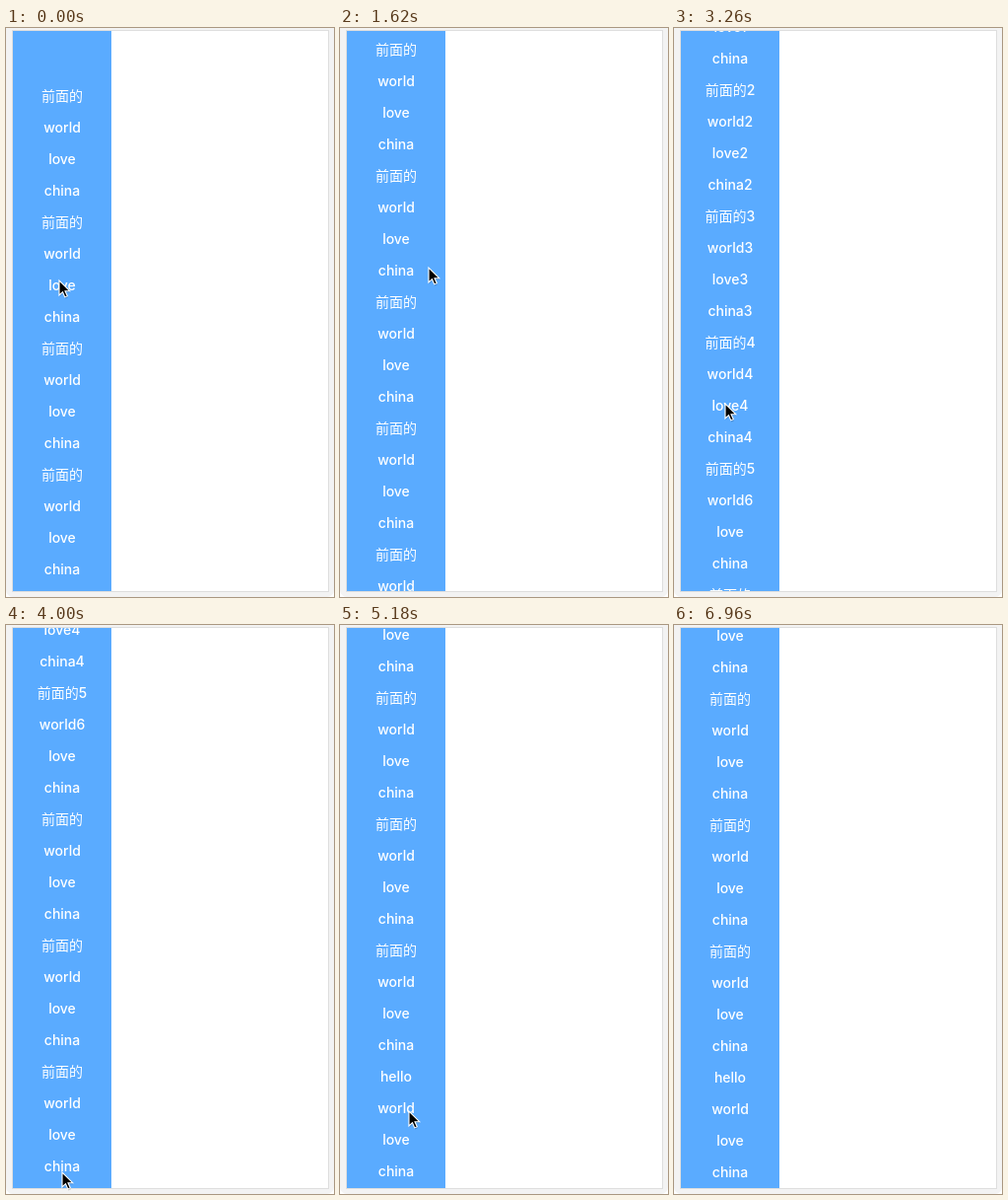
An HTML page that plays this animation: 333x577 px, repeating every 8910 ms.

```html
<!DOCTYPE html>
<html lang="en">
<head>
<meta charset="utf-8">
<title>Scrolling list</title>
<style>
  html, body { margin: 0; width: 100%; height: 100%; overflow: hidden; background: #fff; }
  svg { display: block; width: 333px; height: 577px; }
  text {
    font: 500 14px Inter, "Noto Sans CJK SC", "Noto Sans CJK", sans-serif;
    fill: #fff;
    text-anchor: middle;
  }
</style>
</head>
<body>
<svg viewBox="0 0 333 577">
  <defs>
    <clipPath id="view"><rect x="7" y="3" width="100" height="568"/></clipPath>
  </defs>
  <rect y="-10" width="333" height="587" rx="7" fill="#f3f3f3"/>
  <rect x="6.5" y="2.5" width="321" height="569" fill="#fff" stroke="#dedede"/>
  <rect x="7" y="3" width="100" height="568" fill="#5aabff"/>
  <g clip-path="url(#view)"><g id="list"></g></g>
  <g id="cursor">
    <path d="M.5 1.5V16.5L4 13.2 6.3 18.4 9 17.3 6.7 12.2H11.4Z" fill="#000" opacity=".18"/>
    <path d="M0 0V15L3.5 11.7 5.8 16.9 8.3 15.8 6 10.7H10.7Z" fill="#000" stroke="#fff" stroke-width="1.1"/>
  </g>
</svg>
<script>
const LOOP = 8910, TICK = 148.085, LAST_TICK = 47;
const ROW = 32, TOP = 3;
const list = document.getElementById('list');
const cursor = document.getElementById('cursor');

const words = ['前面的', 'world', 'love', 'china'];
const plain = n => Array(n).fill(words).flat();
const numbered = n => words.map(w => w + n);
const items = [
  ...plain(6),
  '前面的', 'world', 'love1', 'china',
  ...[2, 3, 4].flatMap(numbered),
  '前面的5', 'world6', 'love', 'china',
  ...plain(3),
  'hello', 'world', 'love', 'china'
];

items.forEach((label, i) => {
  const row = document.createElementNS('http://www.w3.org/2000/svg', 'text');
  row.setAttribute('x', 57);
  row.setAttribute('y', TOP + ROW * i + 21);
  row.textContent = label;
  list.append(row);
});

const linear = p => p;
const out = p => p * (2 - p);
const smooth = p => p * p * (3 - 2 * p);

// Each key: tick, values, easing used to arrive there.
const scroll = [
  [0, [50]], [3, [88], out], [7, [0], out], [8, [0]],
  [11, [-125]], [12, [-165]], [15, [-272], out], [16, [-280]],
  [18, [-540]], [22, [-852], out], [24, [-1050]], [27, [-1230], out],
  [28, [-1232]], [29, [-1352]], [30, [-1398]], [34, [-1354], out],
  [35, [-1353]], [39, [-1510]], [45, [-1352], out]
];
const pointer = [
  [0, [54, 256]], [3, [58, 400], out], [7, [62, 410]], [8, [64, 392]],
  [11, [90, 243]], [12, [97, 205]], [15, [79, 440], smooth], [16, [64, 452]],
  [18, [28, 190]], [22, [52, 381], smooth], [24, [84, 183]],
  [26, [60, 530], smooth], [27, [57, 555]], [28, [58, 557]],
  [30, [82, 297]], [34, [68, 490], smooth], [35, [70, 493]],
  [39, [123, 1]], [40, [150, 2]], [44, [264, 1]], [46, [264, -20]]
];

function sample(track, t) {
  const i = track.findIndex(key => key[0] > t);
  if (i < 0) return track[track.length - 1][1];
  const [t0, from] = track[i - 1];
  const [t1, to, ease = linear] = track[i];
  const p = ease((t - t0) / (t1 - t0));
  return from.map((v, j) => Math.round(v + (to[j] - v) * p));
}

function draw(ms) {
  const tick = Math.min(LAST_TICK, Math.floor((ms % LOOP + 14) / TICK));
  list.setAttribute('transform', `translate(0 ${sample(scroll, tick)[0]})`);
  cursor.setAttribute('transform', `translate(${sample(pointer, tick).join(' ')})`);
}

const start = performance.now();
function loop() {
  draw(performance.now() - start);
  requestAnimationFrame(loop);
}
loop();
</script>
</body>
</html>
```
